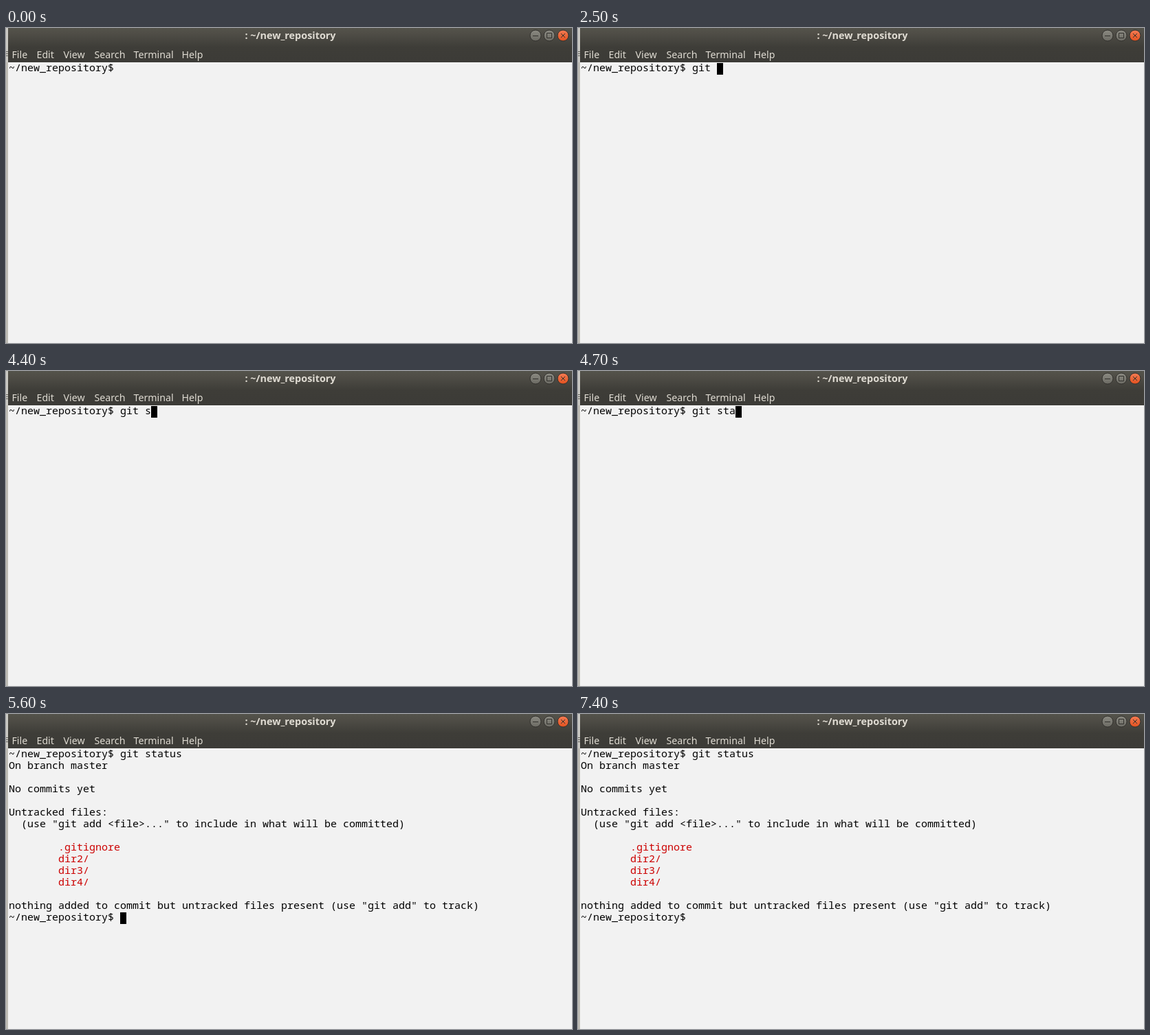
Animation of 823x459 px, one loop 8000 ms. Source, as an HTML page:

```html
<!DOCTYPE html>
<html lang="en">
<head>
<meta charset="utf-8">
<title>Terminal</title>
<style>
  html, body { margin: 0; width: 100%; height: 100%; overflow: hidden; background: #f2f2f2; }
  svg { display: block; width: 100vw; height: 100vh; }
  text { white-space: pre; }
  .mono { font: 15px "Noto Sans Mono", "DejaVu Sans Mono", monospace; }
  .ui { font: 14.2px "Noto Sans", "Open Sans", sans-serif; fill: #dfdbd2; }
  .title { font-size: 14.4px; font-weight: 700; }
</style>
</head>
<body>
<svg id="stage" viewBox="0 0 823 459">
  <defs>
    <linearGradient id="bar" x1="0" y1="0" x2="0" y2="1">
      <stop offset="0" stop-color="#54534b"/>
      <stop offset=".12" stop-color="#514f48"/>
      <stop offset=".56" stop-color="#3e3d38"/>
      <stop offset="1" stop-color="#3c3b37"/>
    </linearGradient>
    <linearGradient id="gray" x1="0" y1="0" x2="0" y2="1">
      <stop offset="0" stop-color="#8b8a82"/>
      <stop offset="1" stop-color="#6b6a63"/>
    </linearGradient>
    <linearGradient id="orange" x1="0" y1="0" x2="0" y2="1">
      <stop offset="0" stop-color="#f47c54"/>
      <stop offset="1" stop-color="#e2511f"/>
    </linearGradient>
  </defs>
  <rect width="823" height="459" fill="#f2f2f2"/>
  <rect width="823" height="50" fill="url(#bar)"/>
  <rect width="3" height="459" fill="#bebcb5"/>
  <rect width="3" height="50" fill="#cbcac5"/>
  <path d="M0 34.5H3M0 37.5H3M0 40.5H3" stroke="#65645f"/>
  <text class="ui title" x="413.5" y="16" text-anchor="middle">: ~/new_repository</text>
  <g id="menu" class="ui"></g>
  <g stroke="#32312d">
    <circle cx="770" cy="11" r="8" fill="url(#gray)"/>
    <circle cx="790" cy="11" r="8" fill="url(#gray)"/>
    <circle cx="810" cy="11" r="8" fill="url(#orange)"/>
    <path d="M766 11.5H774M786.5 7.5H793.5V14.5H786.5ZM807 8L813 14M813 8L807 14" fill="none"/>
  </g>
  <g id="term" class="mono"></g>
  <rect id="cursor" width="9" height="17"/>
</svg>
<script>
const LOOP = 8000, CELL = 9, ROW = 17, LEFT = 4, TOP = 51;
const PROMPT = '~/new_repository$ ';
const COMMAND = 'git status';
const RUN_AT = 5600;

const OUTPUT = [
  'On branch master',
  '',
  'No commits yet',
  '',
  'Untracked files:',
  '  (use "git add <file>..." to include in what will be committed)',
  '',
  '        .gitignore',
  '        dir2/',
  '        dir3/',
  '        dir4/',
  '',
  'nothing added to commit but untracked files present (use "git add" to track)',
  PROMPT
];

// time at which each character of the command appears
const KEYS = [1300, 1300, 2000, 2500, 4400, 4500, 4700, 5000, 5200, 5500];
// times at which the cursor turns on or off, starting off
const BLINKS = [400, 2600, 3200, 3800, 4200, 6200, 6800, 7400];

const byId = id => document.getElementById(id);
const passed = (times, t) => times.filter(at => at <= t).length;

function addText(parent, str, x, y, fill) {
  const el = document.createElementNS('http://www.w3.org/2000/svg', 'text');
  el.setAttribute('x', x);
  el.setAttribute('y', y);
  if (fill) el.setAttribute('fill', fill);
  el.textContent = str;
  parent.append(el);
  return el;
}

const addLine = (str, row) => {
  const indent = str.length - str.trimStart().length;
  return addText(byId('term'), str.trimStart(), LEFT + indent * CELL,
    TOP + 12 + row * ROW, indent === 8 ? '#c00' : '#000');
};

[['File', 9], ['Edit', 45], ['View', 84], ['Search', 129], ['Terminal', 186], ['Help', 256]]
  .forEach(([label, x]) => addText(byId('menu'), label, x - 0.5, 44));

const input = addLine(PROMPT, 0);
const output = OUTPUT.map((str, i) => addLine(str, i + 1));
const cursor = byId('cursor');

function draw(t) {
  const done = t >= RUN_AT;
  const typed = passed(KEYS, t);
  const col = PROMPT.length + (done ? 0 : typed);
  const row = done ? OUTPUT.length : 0;
  input.textContent = PROMPT + COMMAND.slice(0, typed);
  output.forEach(el => el.setAttribute('visibility', done ? 'visible' : 'hidden'));
  cursor.setAttribute('x', LEFT + col * CELL);
  cursor.setAttribute('y', TOP + row * ROW);
  cursor.setAttribute('visibility', passed(BLINKS, t) % 2 ? 'visible' : 'hidden');
}

const start = performance.now();
function tick() {
  draw((performance.now() - start) % LOOP);
  requestAnimationFrame(tick);
}
draw(0);
tick();
</script>
</body>
</html>
```
